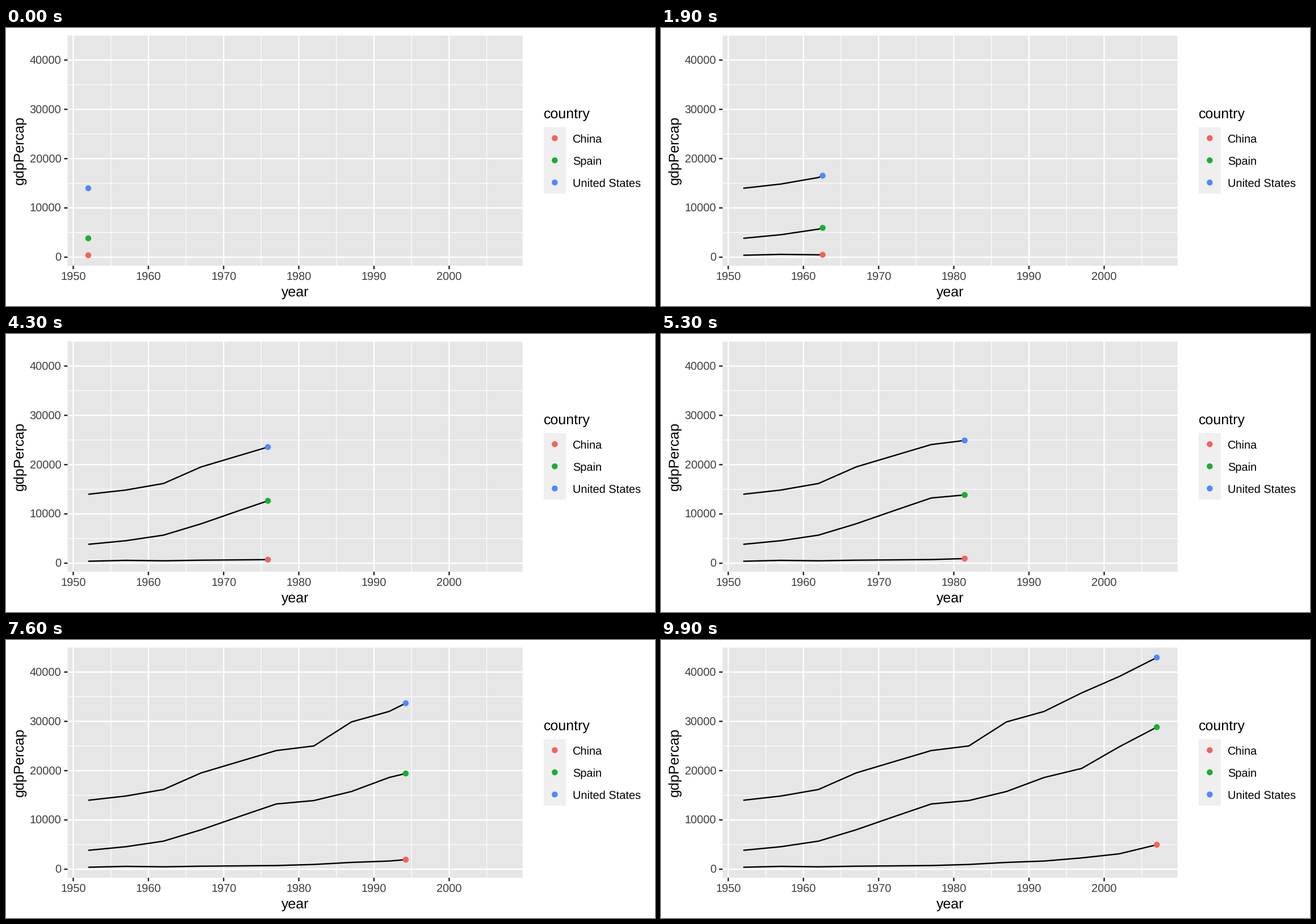
Animation of 1143x490 px, one loop 10000 ms. Source, as a matplotlib script:

```python
import numpy as np
import matplotlib.pyplot as plt
from matplotlib.animation import FuncAnimation
from matplotlib.patches import Rectangle

plt.rcParams.update({
    "font.family": "Liberation Sans",
    "path.snap": False,
    "text.hinting": "none",
})

W, H, DPI = 1143, 490, 64
PT = 72 / DPI                      # points per pixel
FRAMES, INTERVAL = 100, 100

LEFT, RIGHT, TOP, BOTTOM = 108.5, 909.6, 12.4, 419.0
KEY_X, KEY_Y, KEY = 946.9, 174.7, 39.04
LINE, DOT, TICK = 2.42, 10.5, 6.2
SMALL, LARGE = 19.96, 24.95
PANEL, KEY_FILL, TICK_COLOR, LABEL = "#e6e6e6", "#efefef", "#262626", "#3e3e3e"
COLORS = ["#f5625a", "#18b02f", "#4f88ff"]

years = np.arange(1952, 2008, 5)
gdp = {
    "China": [400.4, 576.0, 487.7, 612.7, 676.9, 741.2,
              962.4, 1378.9, 1655.8, 2289.2, 3119.3, 4959.1],
    "Spain": [3834.0, 4564.8, 5693.8, 7993.5, 10638.8, 13236.9,
              13926.2, 15765.0, 18603.1, 20445.3, 24835.5, 28821.1],
    "United States": [13990.5, 14847.1, 16173.1, 19530.4, 21806.0, 24072.6,
                      25009.6, 29884.4, 32003.9, 35767.4, 39097.1, 42951.7],
}
values = np.array(list(gdp.values()))


def padded(data):
    lo, hi = np.min(data), np.max(data)
    pad = 0.05 * (hi - lo)
    return lo - pad, hi + pad


fig = plt.figure(figsize=(W / DPI, H / DPI), dpi=DPI, facecolor="white")

# Page in pixel units, y pointing down
page = fig.add_axes([0, 0, 1, 1])
page.set(xlim=(0, W), ylim=(H, 0))
page.axis("off")

# Panel in data units
panel = fig.add_axes([LEFT / W, 1 - BOTTOM / H, (RIGHT - LEFT) / W, (BOTTOM - TOP) / H])
panel.set(xlim=padded(years), ylim=padded(values))
panel.axis("off")


def to_px(year, value):
    x0, x1 = panel.get_xlim()
    y0, y1 = panel.get_ylim()
    return (LEFT + (year - x0) / (x1 - x0) * (RIGHT - LEFT),
            BOTTOM - (value - y0) / (y1 - y0) * (BOTTOM - TOP))


def label(x, y, text, size=SMALL, color="black", ha="left", **kw):
    page.text(x, y, text, fontsize=size * PT, color=color, ha=ha, va="baseline", **kw)


def box(x, y, w, h, color):
    page.add_patch(Rectangle((x, y), w, h, facecolor=color, linewidth=0))


def tick(xs, ys):
    page.plot(xs, ys, color=TICK_COLOR, lw=LINE * PT, solid_capstyle="butt")


def dots(ax, x, y):
    return ax.scatter(x, y, s=(DOT * PT) ** 2, c=COLORS, linewidths=0, zorder=5)


def grid(xs, ys, width):
    for x in xs:
        panel.axvline(x, color="white", lw=width * PT, zorder=1)
    for y in ys:
        panel.axhline(y, color="white", lw=width * PT, zorder=1)


x_breaks = range(1950, 2001, 10)
y_breaks = range(0, 40001, 10000)

box(LEFT, TOP, RIGHT - LEFT, BOTTOM - TOP, PANEL)
grid(range(1955, 2006, 10), range(5000, 45001, 10000), LINE / 2)
grid(x_breaks, y_breaks, LINE)

for year in x_breaks:
    x = to_px(year, 0)[0]
    tick([x, x], [BOTTOM, BOTTOM + TICK])
    label(x, 444.7, str(year), color=LABEL, ha="center")
for value in y_breaks:
    y = to_px(1950, value)[1]
    tick([LEFT - TICK, LEFT], [y, y])
    label(97.3, y + 7.1, str(value), color=LABEL, ha="right")

label((LEFT + RIGHT) / 2, 472.4, "year", LARGE, ha="center")
page.text(30.6, (TOP + BOTTOM) / 2, "gdpPercap", fontsize=LARGE * PT, rotation=90,
          rotation_mode="anchor", ha="center", va="baseline")

# Legend
label(KEY_X, 158.8, "country", LARGE)
box(KEY_X, KEY_Y, KEY, 3 * KEY, KEY_FILL)
key_mid = KEY_Y + KEY * (np.arange(3) + 0.5)
dots(page, [KEY_X + KEY / 2] * 3, key_mid)
for name, y in zip(gdp, key_mid):
    label(KEY_X + KEY + 12.4, y + 7.4, name)

lines = [panel.plot([], [], color="black", lw=LINE * PT, solid_capstyle="butt",
                    solid_joinstyle="round", zorder=3)[0] for _ in gdp]
heads = dots(panel, [years[0]] * 3, values[:, 0])
heads.set_clip_on(False)


def draw(frame):
    now = years[0] + (years[-1] - years[0]) * frame / (FRAMES - 1)
    xs = np.append(years[years < now], now)
    tips = []
    for line, row in zip(lines, values):
        ys = np.interp(xs, years, row)
        line.set_data(xs, ys)
        tips.append((now, ys[-1]))
    heads.set_offsets(tips)
    return [*lines, heads]


anim = FuncAnimation(fig, draw, frames=FRAMES, interval=INTERVAL,
                     repeat=True, repeat_delay=0, blit=False)
plt.show()
```
